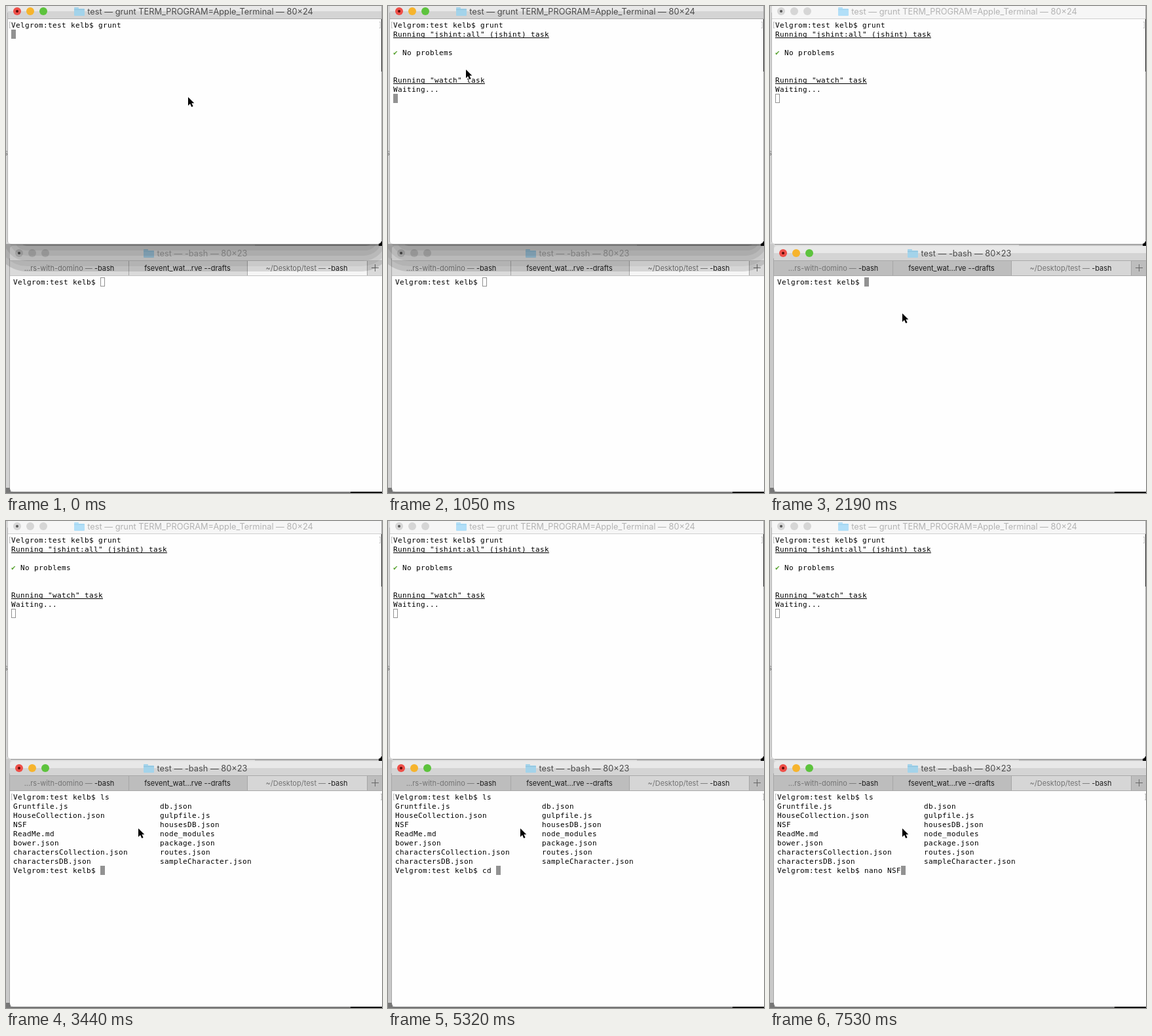
An HTML page with a canvas that plays this animation: 574x743 px, repeating every 8 s.

```html
<!DOCTYPE html>
<html lang="en">
<head>
<meta charset="utf-8">
<title>Two terminal windows</title>
<style>
  html, body { margin: 0; width: 100%; height: 100%; overflow: hidden; background: #d4d4d4; }
  canvas { display: block; }
</style>
</head>
<body>
<canvas id="stage" width="574" height="743"></canvas>
<script>
const ctx = document.getElementById('stage').getContext('2d');
const LOOP = 8000, TICK = 87.5, SWITCH = 2190;
const CELL_W = 7, CELL_H = 14;
const MONO = '11px "DejaVu Sans Mono", monospace';
const SANS = 'Inter, sans-serif';
const PROMPT = 'Velgrom:test kelb$ ';

const GRUNT = ['_Running "jshint:all" (jshint) task', '', '✔ No problems', '', '',
  '_Running "watch" task', 'Waiting...', ''];
const FILES = [
  ['Gruntfile.js', 'db.json'],
  ['HouseCollection.json', 'gulpfile.js'],
  ['NSF', 'housesDB.json'],
  ['ReadMe.md', 'node_modules'],
  ['bower.json', 'package.json'],
  ['charactersCollection.json', 'routes.json'],
  ['charactersDB.json', 'sampleCharacter.json'],
].map(([left, right]) => left.padEnd(32) + right);

// [start time, value]
const OUTPUT_LINES = [[0, 0], [90, 1], [180, 2], [260, 4], [350, 5], [440, 6], [530, 8]];
const FIRST_COMMAND = [[0, ''], [3270, 'l'], [3355, 'ls']];
const SECOND_COMMAND = [[0, ''], [3980, 'c'], [4065, 'cd'], [4150, 'cd '], [4330, 'cd N'],
  [5320, 'cd '], [5500, 'cd'], [5670, 'cd '], [6030, 'cd'], [6110, 'c'], [6290, ''],
  [6370, 'n'], [6550, 'na'], [6640, 'nano'], [6910, 'nano '],
  [7360, 'nano N'], [7445, 'nano NS'], [7530, 'nano NSF']];
const LISTED = 3440;

// [time, x, y] of the pointer tip
const POINTER = [[0, 278, 138], [437, 278, 138], [612, 267, 136], [1050, 119, 96],
  [1400, 101, 159], [1575, 101, 159], [2012, 202, 468], [LOOP, 202, 468]];

const valueAt = (steps, t) => steps.findLast(([start]) => start <= t)[1];

function box(x, y, w, h, color, radius = 0) {
  ctx.fillStyle = color;
  ctx.beginPath();
  ctx.roundRect(x, y, w, h, radius);
  ctx.fill();
}

function label(text, x, y, color, align = 'left') {
  ctx.fillStyle = color;
  ctx.textAlign = align;
  ctx.fillText(text, x, y);
}

function gridText(text, x, top) {
  ctx.font = MONO;
  const underlined = text[0] === '_';
  if (underlined) text = text.slice(1);
  [...text].forEach((ch, i) =>
    label(ch, x + i * CELL_W, top + 11, ch === '✔' ? '#55a02c' : '#000'));
  if (underlined) box(x, top + 12, text.length * CELL_W, 1, '#000');
}

function caret(x, y, active) {
  box(x, y, CELL_W, CELL_H, '#929292');
  if (!active) box(x + 1, y + 1, CELL_W - 2, CELL_H - 2, '#fefefe');
}

function lineMarks(left, right, y) {
  for (const [x, tick] of [[left, left], [right, right - 1]]) {
    box(x, y, 1, 10, '#bcbcbc');
    box(tick, y, 2, 1, '#bcbcbc');
    box(tick, y + 9, 2, 1, '#bcbcbc');
  }
}

function titleBar(x, y, w, h, split, active, title, titleX, folderX, middle, radius) {
  box(x, y, w, h, active ? '#d4d4d4' : '#f6f6f6', radius);
  if (active) box(x, y, w, split, '#e8e8e8', radius);
  box(x, y + h - 1, w, 1, active ? '#a9a9a9' : '#cfcfcf');

  const lights = active ? ['#ee4f48', '#f6b42d', '#5dc33d'] : ['#d6d6d6', '#d6d6d6', '#d6d6d6'];
  lights.forEach((color, i) => box(x + 8 + i * 20, middle - 6, 12, 12, color, 6));
  box(x + 12, middle - 2, 4, 4, active ? '#5a0a08' : '#555', 2);

  const folder = active ? '#a3d3ea' : '#b2dff8';
  box(folderX, middle - 6, 7, 5, folder, 1);
  box(folderX, middle - 4, 16, 11, folder, 1);
  box(folderX, middle - 3, 16, 1, active ? '#8fc3de' : '#9fd3ef');

  ctx.font = '12.8px ' + SANS;
  label(title, titleX, middle + 5, active ? '#4b4b4b' : '#b3b3b3', 'center');
}

function tab(x, w, color, center, dim, dark) {
  box(x, 389, w, 22, color);
  ctx.font = '11px ' + SANS;
  const dimWidth = ctx.measureText(dim).width;
  const left = center - (dimWidth + ctx.measureText(dark).width) / 2;
  label(dim, left, 404, '#747474');
  label(dark, left + dimWidth, 404, '#1c1c1c');
}

function desktop(active) {
  box(0, 0, 574, 743, '#d6d6d6');
  box(0, 363, 6, 378, active ? '#c9c9c9' : '#d2d2d2');
  box(5, 385, 1, 354, '#a5a5a5');
  box(2, 10, 1, 350, '#b4b4b4');
  ctx.font = '11px ' + SANS;
  label('s', -3, 228, '#777');
  box(380, 363, 194, 3, '#bdbdbd');
  box(0, 741, 574, 2, '#777');
  box(0, 735, 7, 8, '#777');
  box(526, 740, 48, 3, '#000');
  box(573, 0, 1, 363, '#a8a8a8');
  box(573, 20, 1, 80, '#222');
  box(569, 359, 5, 7, '#000');
}

function lowerWindow(t, active) {
  box(6, 366, 568, 375, '#fefefe', [5, 0, 0, 5]);
  titleBar(6, 366, 568, 23, 11, active, 'test — -bash — 80×23', 299.5, 210, 377, [5, 0, 0, 0]);

  const back = active ? '#bdbdbd' : '#dadada';
  const front = active ? '#d6d6d6' : '#f6f6f6';
  tab(6, 181, back, 96.5, '...rs-with-domino — ', '-bash');
  tab(188, 180, back, 277, '', 'fsevent_wat...rve --drafts');
  tab(369, 182, front, 459, '~/Desktop/test — ', '-bash');
  box(552, 389, 22, 22, back);
  for (const x of [187, 368, 551]) box(x, 389, 1, 22, '#a6a6a6');
  box(558, 399, 11, 1, '#666');
  box(563, 394, 1, 11, '#666');
  box(6, 411, 568, 1, active ? '#a9a9a9' : '#c4c4c4');

  const listed = t >= LISTED;
  const command = valueAt(listed ? SECOND_COMMAND : FIRST_COMMAND, t);
  const lines = listed ? [PROMPT + 'ls', ...FILES, PROMPT + command] : [PROMPT + command];
  lines.forEach((line, i) => gridText(line, 11, 414 + i * CELL_H));
  if (listed) lineMarks(8, 573, 416);
  caret(11 + lines.at(-1).length * CELL_W, 414 + (lines.length - 1) * CELL_H, active);
}

// Stepped shadow cast by the upper window while it has focus
function upperShadow() {
  ctx.save();
  ctx.beginPath();
  ctx.rect(0, 363, 574, 50);
  ctx.clip();
  [[3, .16], [10, .065], [18, .07], [26, .085], [34, .06], [42, .13]].forEach(([reach, alpha]) =>
    box(22 - reach, 200, 538 + reach * 1.8, 163 + reach, `rgba(0,0,0,${alpha})`, reach + 10));
  ctx.restore();
}

function upperWindow(t, active) {
  box(3, 0, 570, 363, '#fefefe', [0, 0, 5, 5]);
  titleBar(3, 0, 570, 20, 8, active,
    'test — grunt TERM_PROGRAM=Apple_Terminal — 80×24', 296.5, 104, 8, 0);
  box(7, 363, 562, 1, '#8f8f8f');
  const lines = [PROMPT + 'grunt', ...GRUNT.slice(0, valueAt(OUTPUT_LINES, t))];
  lines.forEach((line, i) => gridText(line, 8, 22 + i * CELL_H));
  lineMarks(5, 571, 24);
  const row = Math.max(1, lines.length - (t >= 530 ? 1 : 0));
  caret(8, 22 + row * CELL_H, active);
}

function pointer(t) {
  const now = Math.floor((t + 15) / TICK) * TICK;
  const next = Math.max(1, POINTER.findIndex(([time]) => time > now));
  const [t0, x0, y0] = POINTER[next - 1], [t1, x1, y1] = POINTER[next];
  const k = (now - t0) / (t1 - t0);
  ctx.save();
  ctx.translate(Math.round(x0 + (x1 - x0) * k), Math.round(y0 + (y1 - y0) * k));
  const arrow = new Path2D('M0 1V14L3 11L5.3 16L7.6 15L5.4 10.2H9.3Z');
  ctx.strokeStyle = '#fff';
  ctx.lineWidth = 2;
  ctx.stroke(arrow);
  ctx.fillStyle = '#000';
  ctx.fill(arrow);
  ctx.restore();
}

function draw(time) {
  const t = time % LOOP;
  const lowerActive = t >= SWITCH;
  desktop(lowerActive);
  lowerWindow(t, lowerActive);
  if (!lowerActive) upperShadow();
  upperWindow(t, !lowerActive);
  pointer(t);
  requestAnimationFrame(draw);
}
requestAnimationFrame(draw);
</script>
</body>
</html>
```
